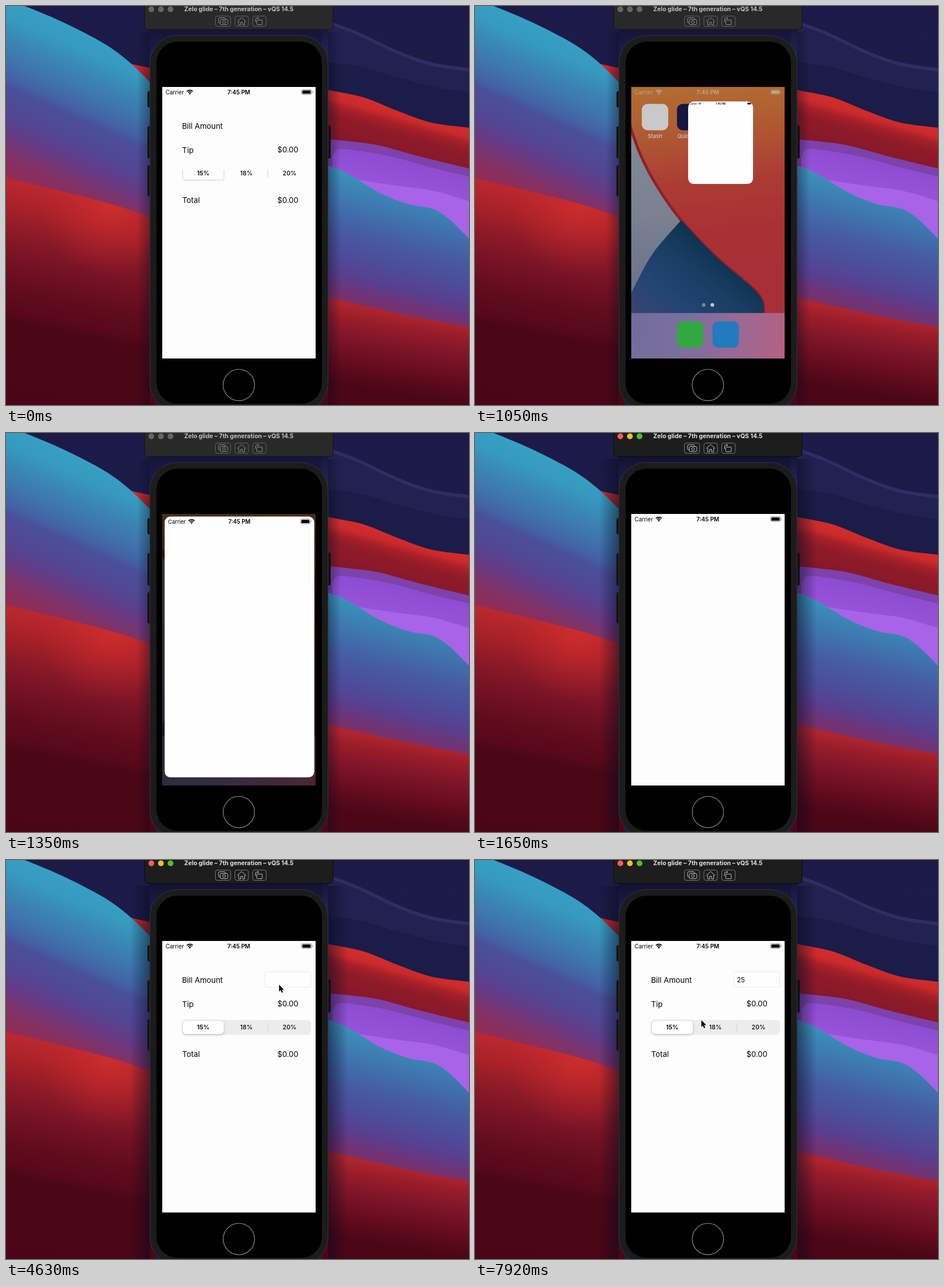
An HTML page with a canvas that plays this animation: 806 by 695 pixels, repeating every 8 s.

```html
<!DOCTYPE html>
<html lang="en">
<head>
<meta charset="utf-8">
<title>Tip calculator</title>
<style>
html, body { margin: 0; width: 100%; height: 100%; overflow: hidden; background: #000; }
canvas { display: block; width: 806px; height: 695px; }
</style>
</head>
<body>
<canvas id="stage" width="806" height="695"></canvas>
<script>
const ctx = document.getElementById('stage').getContext('2d');
const LOOP = 8000;
const SCREEN = { x: 272, y: 141, w: 267, h: 473 };
const lerp = (a, b, p) => a + (b - a) * p;

function text(str, x, y, size, color = '#000', weight = 400, align = 'left') {
  ctx.font = `${weight} ${size}px Inter, "Liberation Sans", sans-serif`;
  ctx.textAlign = align;
  ctx.fillStyle = color;
  ctx.fillText(str, x, y);
}

function rounded(x, y, w, h, r, fill, stroke, width = 1) {
  ctx.beginPath();
  ctx.roundRect(x, y, w, h, r);
  if (fill) { ctx.fillStyle = fill; ctx.fill(); }
  if (stroke) { ctx.strokeStyle = stroke; ctx.lineWidth = width; ctx.stroke(); }
}

function disc(x, y, r, fill, stroke, width = 1) {
  ctx.beginPath();
  ctx.arc(x, y, r, 0, Math.PI * 2);
  if (fill) { ctx.fillStyle = fill; ctx.fill(); }
  if (stroke) { ctx.strokeStyle = stroke; ctx.lineWidth = width; ctx.stroke(); }
}

// Gradient whose colour lines follow y = y0 + slope * x; stops are [y0, colour].
function slanted(slope, stops) {
  const top = stops[0][0], span = stops[stops.length - 1][0] - top;
  const n = span / (1 + slope * slope);
  const g = ctx.createLinearGradient(0, top, -slope * n, top + n);
  for (const [y, color] of stops) g.addColorStop((y - top) / span, color);
  return g;
}

function across(x0, y0, x1, y1, ...colors) {
  const g = ctx.createLinearGradient(x0, y0, x1, y1);
  colors.forEach((c, i) => g.addColorStop(i / (colors.length - 1), c));
  return g;
}

// Smooth curve through the points.
function curve(pts) {
  ctx.lineTo(...pts[0]);
  for (let i = 0; i < pts.length - 1; i++) {
    const a = pts[i - 1] || pts[i], b = pts[i], c = pts[i + 1], d = pts[i + 2] || c;
    ctx.bezierCurveTo(b[0] + (c[0] - a[0]) / 6, b[1] + (c[1] - a[1]) / 6,
      c[0] - (d[0] - b[0]) / 6, c[1] - (d[1] - b[1]) / 6, c[0], c[1]);
  }
}

// Everything below a curve, down to the floor.
function band(pts, fill, floor = 695) {
  ctx.beginPath();
  curve(pts);
  ctx.lineTo(pts[pts.length - 1][0], floor);
  ctx.lineTo(pts[0][0], floor);
  ctx.fillStyle = fill;
  ctx.fill();
}

function desktop(active) {
  ctx.fillStyle = across(0, 0, 0, 150, '#1d1a48', '#1c1c48');
  ctx.fillRect(0, 0, 806, 695);

  // left side
  band([[214, 100], [232, 104], [260, 110]], across(0, 100, 0, 132, '#d32c2c', '#9c2030'));
  band([[0, -12], [50, 7], [105, 31], [170, 65], [215, 98], [260, 142]], slanted(.45, [
    [-15, '#369fc4'], [20, '#3799be'], [55, '#3a86b5'], [92, '#3f74ad'],
    [126, '#4360a4'], [138, '#4a509b'], [190, '#544592'], [222, '#663a84'],
    [255, '#803268'], [305, '#962a50']]));
  band([[0, 299], [60, 314], [130, 331], [200, 350], [260, 371]], slanted(.2, [
    [286, '#a0264a'], [304, '#bb282f'], [345, '#a92228'], [390, '#8d1a28'],
    [435, '#781325'], [490, '#620c1e'], [534, '#560919'], [546, '#4c0717'], [690, '#4a0616']]));
  const glow = ctx.createRadialGradient(180, 350, 0, 180, 350, 120);
  glow.addColorStop(0, 'rgba(216,48,44,.65)');
  glow.addColorStop(1, 'rgba(200,40,44,0)');
  ctx.save();
  ctx.beginPath();
  curve([[0, 299], [60, 314], [130, 331], [200, 350], [260, 371]]);
  ctx.lineTo(260, 470); ctx.lineTo(0, 470); ctx.clip();
  ctx.fillStyle = glow;
  ctx.fillRect(50, 290, 210, 180);
  ctx.restore();

  // right side
  band([[550, 22], [610, 44], [680, 77], [740, 98], [806, 108]], '#2f2d64', 300);
  band([[550, 28], [610, 50], [680, 83], [740, 104], [806, 114]], '#222252', 300);
  band([[550, 98], [610, 104], [680, 124], [750, 142], [806, 150]], '#1b1c47', 300);
  band([[550, 145], [575, 149], [625, 160], [680, 182], [740, 203], [806, 212]], slanted(.28, [
    [-20, '#d42d2d'], [2, '#cb2a2b'], [14, '#a82028'], [30, '#901b29'], [75, '#84172a']]));
  band([[550, 231], [600, 236], [650, 243], [720, 262], [806, 283]], '#7d42ab');
  band([[568, 262], [577, 250], [605, 251], [670, 262], [740, 281], [806, 297]], slanted(.2, [
    [125, '#8c4bd0'], [190, '#9855dc'], [240, '#a15de2']]));
  band([[580, 296], [620, 304], [680, 313], [745, 322], [806, 340]], '#a863e8');
  band([[550, 275], [575, 283], [602, 296], [650, 325], [700, 345], [742, 353], [770, 370], [806, 405]],
    slanted(.25, [[125, '#3b9ac0'], [162, '#3b87b5'], [205, '#4070ad'], [244, '#465ba2'],
      [285, '#4c4d9b'], [322, '#593f8e'], [348, '#703376'], [385, '#7c2f62']]));
  band([[550, 504], [600, 516], [680, 535], [750, 549], [806, 559]], slanted(.16, [
    [412, '#a82440'], [426, '#ae2530'], [448, '#9a1d29'], [478, '#821629'],
    [515, '#6c0e21'], [546, '#560919'], [565, '#4c0717'], [660, '#4a0616']]));

  // window shadow
  const dark = active ? .5 : .36, reach = active ? 34 : 22;
  const shade = `rgba(8,8,30,${dark})`, none = 'rgba(8,8,30,0)';
  ctx.fillStyle = across(250 - reach, 0, 250, 0, none, shade);
  ctx.fillRect(250 - reach, 45, reach, 650);
  ctx.fillStyle = across(561, 0, 561 + reach, 0, shade, none);
  ctx.fillRect(561, 45, reach, 650);
  ctx.fillStyle = across(0, 41, 0, 80, shade, none);
  ctx.fillRect(250, 41, 311, 40);
}

function toolbar(active) {
  rounded(241.5, -10, 328, 51, 6, active ? '#1d1d1e' : '#29292a', active ? '#090909' : '#111');
  const lights = active ? ['#fb5c55', '#f0bb35', '#4fc02f'] : ['#666667', '#666667', '#666667'];
  lights.forEach((c, i) => disc(253 + i * 16.7, 5.7, 5, c));
  const ink = active ? '#e3e3e3' : '#c0c0c0', line = active ? '#bdbdbd' : '#8c8c8c';
  text('Zelo glide – 7th generation – vQS 14.5', 405.5, 9.3, 10.5, ink, 700, 'center');
  for (const [x, w] of [[364.5, 26.5], [398.5, 23.5], [429.5, 23.5]])
    rounded(x, 17.5, w, 18, 3.5, null, active ? '#777' : '#626262');
  // camera
  rounded(370, 20.5, 12, 9, 2, null, line);
  rounded(373, 23.5, 13, 9, 2, active ? '#1d1d1e' : '#29292a', line);
  disc(379.5, 28, 2.5, null, line);
  // house
  ctx.beginPath();
  ctx.moveTo(402.5, 27); ctx.lineTo(410.2, 20); ctx.lineTo(418, 27);
  ctx.moveTo(405, 26); ctx.lineTo(405, 33); ctx.lineTo(408.6, 33); ctx.lineTo(408.6, 28.5);
  ctx.lineTo(412, 28.5); ctx.lineTo(412, 33); ctx.lineTo(415.5, 33); ctx.lineTo(415.5, 26);
  ctx.stroke();
  // rotate
  rounded(436.5, 24.5, 9.5, 8, 1, null, line);
  ctx.beginPath();
  ctx.moveTo(434.5, 28); ctx.lineTo(434.5, 23); ctx.quadraticCurveTo(434.5, 21, 437, 21); ctx.lineTo(440, 21);
  ctx.moveTo(438, 19); ctx.lineTo(440, 21); ctx.lineTo(438, 23);
  ctx.stroke();
}

function phone() {
  for (const [x, y, h] of [[247, 149, 27], [247, 210, 55], [247, 278, 53], [560, 209, 56]])
    rounded(x, y, 4.5, h, 1.5, '#141414', '#050505');
  rounded(250.5, 51.5, 310, 653, 47, '#1c1c1c', '#343434');
  rounded(262, 62, 288, 631, 37, '#000');
  disc(405.4, 660.2, 27.3, null, '#777', 1.4);
}

function statusBar(color) {
  text('Carrier', 277.8, 153.6, 9.8, color);
  text('7:45 PM', 405.3, 153.6, 10, color, 600, 'center');
  ctx.strokeStyle = ctx.fillStyle = color;
  ctx.lineWidth = 1.7;
  for (const r of [4.6, 7.4]) {
    ctx.beginPath();
    ctx.arc(320, 154, r, -Math.PI * .75, -Math.PI * .25);
    ctx.stroke();
  }
  ctx.beginPath();
  ctx.moveTo(320, 154.4);
  ctx.arc(320, 154, 2.6, -Math.PI * .75, -Math.PI * .25);
  ctx.fill();
  ctx.save();
  ctx.globalAlpha *= .45;
  rounded(514.3, 145.5, 17.6, 8.6, 2.8, null, color);
  rounded(532.8, 148.4, 1, 3, .5, color);
  ctx.restore();
  rounded(515.8, 147, 14.6, 5.8, 1.6, color);
}

function wallpaper() {
  ctx.fillStyle = slanted(-.1, [[165, '#e18b40'], [225, '#df7b3e'], [285, '#dd6540'],
    [340, '#da4d41'], [430, '#d63e43'], [660, '#d63a47']]);
  ctx.fillRect(250, 120, 310, 520);
  const edge = [[262, 190], [285, 255], [316, 314], [358, 373], [420, 438], [494, 503], [505, 538], [498, 570], [470, 640]];
  ctx.beginPath();
  curve(edge);
  ctx.lineTo(250, 640); ctx.lineTo(250, 190);
  ctx.fillStyle = across(0, 220, 0, 500, '#a3afbf', '#9ba4b8', '#8990b0');
  ctx.fill();
  ctx.strokeStyle = '#b32a38';
  ctx.lineWidth = 5;
  ctx.beginPath(); curve(edge.slice(0, 7)); ctx.stroke();
  ctx.beginPath();
  curve([[358, 373], [420, 438], [494, 503], [505, 538], [498, 570], [470, 640]]);
  ctx.lineTo(250, 640);
  curve([[250, 545], [272, 497], [307, 433], [358, 373]]);
  ctx.fillStyle = across(420, 425, 310, 560, '#123f64', '#204f80', '#2c5890', '#475591');
  ctx.fill();
}

const tile = (x, y, fill) => rounded(x, y, 47, 47, 10.5, fill);

function homeScreen(zoom, dim, statusColor) {
  ctx.save();
  ctx.translate(405.5, 377.5);
  ctx.scale(zoom, zoom);
  ctx.translate(-405.5, -377.5);
  wallpaper();
  ctx.fillStyle = across(272, 545, 539, 600, '#9189c6', '#9a8cca', '#c086bd', '#e37ba4');
  ctx.fillRect(250, 538, 310, 110);
  tile(288, 166.3, '#fff');
  tile(350.5, 166.3, '#1b1c50');
  tile(413.5, 166.3, '#484848');
  installGrid(413.5, 166.3);
  tile(350.5, 552.6, '#3fd552');
  tile(413.5, 552.6, '#2a9cf0');
  [['Stash', 311.3], ['Quicksets', 374], ['Installing...', 437]]
    .forEach(([label, x]) => text(label, x, 226.8, 9.6, '#fff', 500, 'center'));
  disc(398, 523.6, 3.2, 'rgba(255,255,255,.5)');
  disc(413.3, 523.6, 3.2, '#fff');
  ctx.restore();
  statusBar(statusColor);
  ctx.fillStyle = `rgba(0,0,0,${dim})`;
  ctx.fillRect(272, 141, 267, 473);
}

function installGrid(x, y) {
  ctx.strokeStyle = '#353535';
  ctx.lineWidth = .8;
  ctx.beginPath();
  for (const d of [4, 13.5, 18, 23.5, 29, 33.5, 43]) {
    ctx.moveTo(x + d, y + 1); ctx.lineTo(x + d, y + 46);
    ctx.moveTo(x + 1, y + d); ctx.lineTo(x + 46, y + d);
  }
  ctx.moveTo(x + 3, y + 3); ctx.lineTo(x + 44, y + 44);
  ctx.moveTo(x + 44, y + 3); ctx.lineTo(x + 3, y + 44);
  ctx.stroke();
  for (const r of [7, 11, 19]) disc(x + 23.5, y + 23.5, r, null, '#353535', .8);
}

// The app grows out of its icon.
function openingApp(p) {
  const left = lerp(413.5, SCREEN.x, p), w = lerp(47, SCREEN.w, p);
  const top = lerp(166.3, SCREEN.y, p ** 6.4), bottom = lerp(213.3, 614, p ** 1.18);
  ctx.save();
  rounded(left, top, w, bottom - top, 10, '#fefefe');
  ctx.clip();
  const s = w / SCREEN.w;
  ctx.translate(left, top);
  ctx.scale(s, s);
  ctx.translate(-SCREEN.x, -SCREEN.y);
  statusBar('#000');
  ctx.restore();
}

function form(complete, amount, caret) {
  text('Bill Amount', 306.4, 213.7, 13.3);
  text('Tip', 306.6, 256, 13.3);
  text('Total', 306.8, 342.6, 13.3);
  text('$0.00', 472.6, 255.2, 13.1);
  text('$0.00', 472.6, 342.6, 13.1);

  if (complete) {
    rounded(450.5, 194.5, 80, 27, 4, '#fefefe', '#e9e9e9');
    rounded(306.5, 278.5, 224.5, 26, 6.5, '#ececec');
    ctx.save();
    ctx.shadowColor = 'rgba(0,0,0,.22)';
    ctx.shadowBlur = 4;
    ctx.shadowOffsetY = 1.5;
    rounded(308, 280, 71, 23, 5.5, '#fff');
    ctx.restore();
  } else {
    ctx.beginPath();
    ctx.moveTo(307.5, 285); ctx.lineTo(307.5, 298);
    ctx.quadraticCurveTo(307.5, 303.5, 313, 303.5);
    ctx.lineTo(374, 303.5);
    ctx.quadraticCurveTo(379.5, 303.5, 379.5, 298);
    ctx.lineTo(379.5, 285);
    ctx.strokeStyle = '#cfcfcf';
    ctx.lineWidth = 1;
    ctx.stroke();
  }
  ctx.fillStyle = '#d2d2d4';
  ctx.fillRect(455.3, 284, 1, 15);
  text('15%', 343.4, 295.4, 10.7, '#000', 600, 'center');
  text('18%', 418.4, 295.4, 10.7, '#000', 500, 'center');
  text('20%', 493.6, 295.4, 10.7, '#000', 500, 'center');

  text(amount, 456, 212.5, 11.4);
  if (caret) {
    ctx.fillStyle = `rgba(66,86,232,${caret})`;
    ctx.fillRect(456.2 + amount.length * 6.7, 200.5, 1.7, 15);
  }
}

function pointer(x, y) {
  ctx.beginPath();
  ctx.moveTo(x, y);
  [[0, 12], [2.8, 9.5], [4.9, 14], [6.9, 13], [4.9, 8.8], [8.6, 8.6]]
    .forEach(([dx, dy]) => ctx.lineTo(x + dx, y + dy));
  ctx.closePath();
  ctx.lineJoin = 'round';
  ctx.strokeStyle = '#fff';
  ctx.lineWidth = 2;
  ctx.stroke();
  ctx.fillStyle = '#000';
  ctx.fill();
}

function pointerAt(t) {
  if (t < 3750) return null;
  if (t < 4780) {
    const p = Math.min(1, Math.floor((t - 3750) / 150 + 1) / 7);
    const e = 1 - (1 - p) ** 2;
    return [lerp(300, 479, e), lerp(330, 215, e)];
  }
  if (t < 7630) return [479.5, 215];
  const e = t < 7780 ? .25 : t < 7920 ? .75 : 1;
  return [lerp(479.5, 394, e), lerp(215, 279, e)];
}

function caretAt(t) {
  if (t < 4780 || t >= 7630) return 0;
  if (t < 4930) return .6;
  if (t < 5530) return 1;
  if (t < 5830) return 0;
  return t < 5980 ? .5 : 1;
}

function app(t) {
  ctx.fillStyle = '#fdfdfd';
  ctx.fillRect(SCREEN.x, SCREEN.y, SCREEN.w, SCREEN.h);
  statusBar('#000');
  if (t >= 900 && t < 2250) return;
  ctx.save();
  if (t >= 2250 && t < 2400) ctx.globalAlpha = .5;
  form(t >= 2250, t < 6430 ? '' : t < 7030 ? '2' : '25', caretAt(t));
  ctx.restore();
}

function draw(t) {
  const active = t >= 1500;
  desktop(active);
  toolbar(active);
  phone();
  ctx.save();
  ctx.beginPath();
  ctx.rect(SCREEN.x, SCREEN.y, SCREEN.w, SCREEN.h);
  ctx.clip();
  if (t >= 900 && t < 1500) {
    const step = Math.floor((t - 900) / 150);
    const grow = [0, .3, .8, .97][step];
    homeScreen(1 - grow * .066, grow * .7, step ? 'rgba(255,255,255,.6)' : 'rgba(255,255,255,.8)');
    if (step) openingApp(grow);
  } else {
    app(t);
  }
  ctx.restore();
  const tip = pointerAt(t);
  if (tip) pointer(...tip);
}

const start = performance.now();
function frame() {
  draw((performance.now() - start) % LOOP);
  requestAnimationFrame(frame);
}
frame();
</script>
</body>
</html>
```
